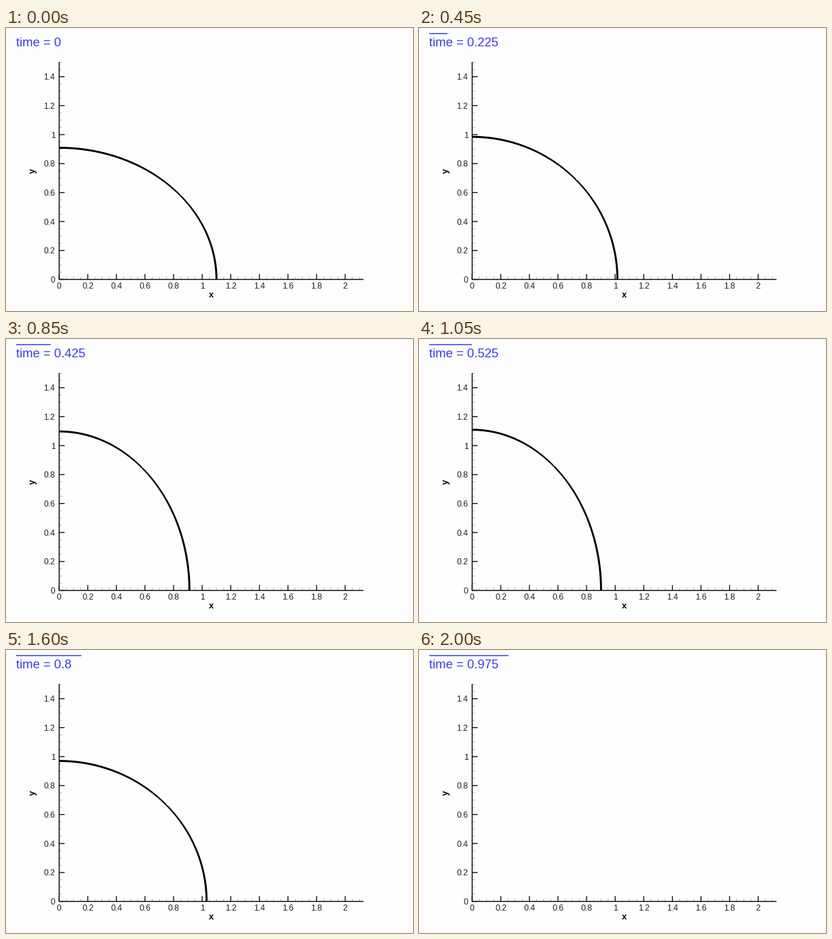
These frames come from a looping animation (600x417 px, 2050 ms). A matplotlib script:

```python
import numpy as np
import matplotlib.pyplot as plt
from matplotlib.animation import FuncAnimation
from matplotlib.collections import LineCollection, PolyCollection
from matplotlib.patches import Rectangle

W, H, DPI = 600, 417, 64
PX = 72 / DPI                    # points per pixel
FRAMES, STEP = 41, 50
X0, Y0, SX, SY = 78.4, 370.5, 210.8, 213.4
BLUE, BLACK, GREY = "#3a3aee", "#000000", "#a0a0a0"
HALF = 1.45                      # half the curve's thickness

fig = plt.figure(figsize=(W / DPI, H / DPI), dpi=DPI, facecolor="#fdfdfd")
ax = fig.add_axes([0, 0, 1, 1])
ax.set_xlim(0, W)
ax.set_ylim(H, 0)
ax.axis("off")


def add_lines(segs, color, width, z=2):
    lines = LineCollection(segs, colors=color, linewidths=width * PX, zorder=z)
    lines.set_snap(False)
    ax.add_collection(lines)
    return lines


def add_text(x, y, text, size, color=BLACK, ha="center", va="baseline", **kw):
    return ax.text(x, y, text, fontsize=size * PX, color=color, ha=ha, va=va,
                   family="Liberation Sans", **kw)


def draw_ticks(count, place, inward, label):
    """Ticks every 0.05; each fourth one is long and labelled."""
    for i in range(count):
        value = i * 0.05
        start = np.array(place(value))
        major = i % 4 == 0
        end = start + np.array(inward) * (8 if major else 4)
        if major:
            add_lines([[start, end]], BLACK, 1.3)
            label(*start, f"{value:g}")
        else:
            add_lines([[start, end]], GREY, 0.8, 1)


def draw_axes():
    draw_ticks(43, lambda v: (X0 + SX * v, Y0), (0, -1),
               lambda x, y, s: add_text(x, y + 13.4, s, 12.2, "#222222"))
    draw_ticks(31, lambda v: (X0, Y0 - SY * v), (1, 0),
               lambda x, y, s: add_text(72.5, y + 4.4, s, 12.2, "#222222", "right"))
    add_lines([[(X0, 50), (X0, Y0)], [(X0 - 0.6, Y0), (527, Y0)]], BLACK, 1.4)
    add_text(302.6, 397.4, "x", 13, weight="bold")
    add_text(40.3, 210.5, "y", 13, va="center", weight="bold", rotation=90)


def band(a, b, lo, hi, off):
    """Slice of the ellipse widened along one pixel axis."""
    th = np.linspace(lo, hi, 80)
    pts = np.column_stack([X0 + SX * a * np.cos(th), Y0 - SY * b * np.sin(th)])
    return np.vstack([pts + off, (pts - off)[::-1]])


draw_axes()
curve = PolyCollection([], facecolors=BLACK, edgecolors="none", zorder=3)
ax.add_collection(curve)
curve.set_clip_path(Rectangle((78, 40), 450, 331, transform=ax.transData))
clock = add_text(15.3, 27, "", 18.5, BLUE, "left")
bar = add_lines([], BLUE, 1.5)


def update(k):
    last = FRAMES - 1
    n = min(k, last - 1)         # the clock holds while the curve is gone
    t = round(n * 0.025, 3)
    clock.set_text(f"time = {t:g}")
    bar.set_segments([[(15, 8.3), (15 + 3 * n, 8.3)]] if n else [])
    a = 1 + 0.1 * np.cos(2 * np.pi * t)
    b = 1 / a
    mid = np.arctan2(b, a)
    curve.set_verts([band(a, b, 0, mid, (HALF, 0)),
                     band(a, b, mid, np.pi / 2, (0, HALF))])
    curve.set_visible(k < last)
    return curve, clock, bar


anim = FuncAnimation(fig, update, frames=FRAMES, interval=STEP,
                     repeat=True, repeat_delay=0, blit=False)
plt.show()
```
